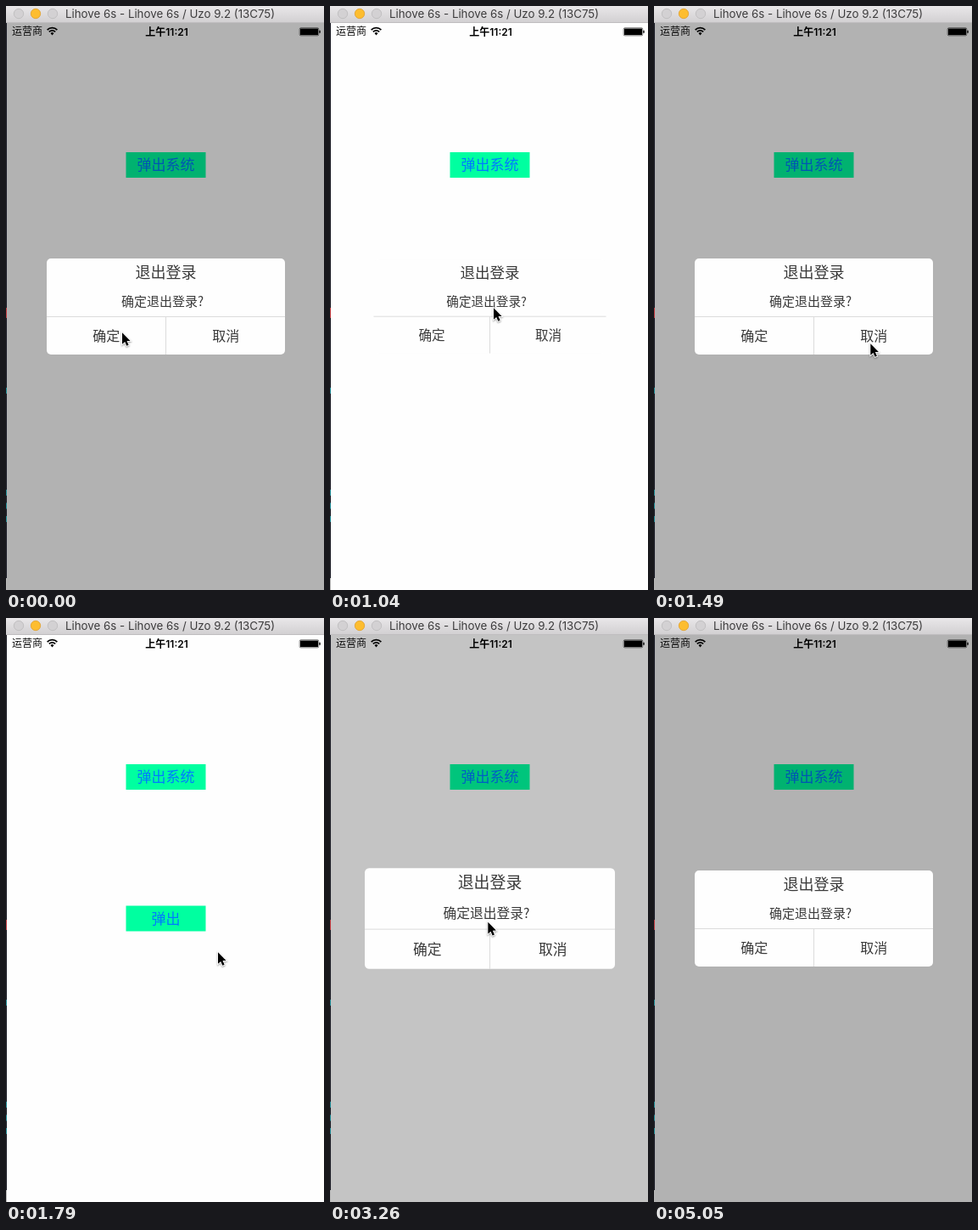
Recreate the animation shown at these times as an HTML page with a canvas. Size 375 by 687 pixels, loop 5490 ms.

```html
<!DOCTYPE html>
<html lang="zh">
<head>
<meta charset="utf-8">
<title>Dialog demo</title>
<style>
html, body { margin: 0; width: 100%; height: 100%; overflow: hidden; background: #fefefe; }
canvas { display: block; width: 375px; height: 687px; }
</style>
</head>
<body>
<canvas id="stage"></canvas>
<script>
const W = 375, H = 687, LOOP = 5490;
const TICK = 148.5, TICK_LEAD = 9;   // the screen refreshes in coarse steps
const CJK = '"Noto Sans CJK SC", "Noto Sans CJK JP", "Noto Sans CJK", sans-serif';
const canvas = document.getElementById('stage');
const ctx = canvas.getContext('2d');
const dpr = window.devicePixelRatio || 1;
canvas.width = W * dpr;
canvas.height = H * dpr;

// Ticks of the clicks that open and close the dialog in turn
const clicks = [-5, 2, 7, 12, 13, 17, 21];

// Where the mouse turns or rests
const path = [
  { k: 2, x: 136, y: 383 },
  { k: 7, x: 192, y: 354 },
  { k: 8, x: 232, y: 393 },
  { k: 9, x: 257, y: 398 },
  { k: 12, x: 249, y: 392 },
  { k: 13, x: 203, y: 360 },
  { k: 15, x: 130, y: 388 },
  { k: 17, x: 130, y: 388 },
  { k: 21, x: 195.5, y: 354 },
  { k: 24, x: 165, y: 362 },
  { k: 26, x: 228, y: 318 },
  { k: 28, x: 262, y: 241 },
  { k: 32, x: 282, y: 629 },
  { k: 33, x: 305, y: 667 }
];

const lerp = (a, b, p) => a + (b - a) * p;

function cursorAt(k) {
  const i = path.findIndex(p => p.k >= k);
  if (i < 1) return path[i];
  const a = path[i - 1], b = path[i], p = (k - a.k) / (b.k - a.k);
  return { x: lerp(a.x, b.x, p), y: lerp(a.y, b.y, p) };
}

// Pops slightly past full size, then settles while the backdrop darkens.
function dialogAt(k) {
  const past = clicks.filter(c => c <= k);
  if (past.length % 2 === 0) return null;
  const age = Math.min(2, k - past[past.length - 1]);
  const scale = age < 1 ? lerp(0.975, 1.05, age) : lerp(1.05, 1, age - 1);
  return { scale, dim: Math.min(0.3, age * 0.226) };
}

function rect(x, y, w, h, color) {
  ctx.fillStyle = color;
  ctx.fillRect(x, y, w, h);
}

function text(str, x, cy, size, color, align = 'center', weight = 400, family = CJK) {
  ctx.font = `${weight} ${size}px ${family}`;
  ctx.textAlign = align;
  ctx.fillStyle = color;
  ctx.fillText(str, x, cy + size * 0.38);
}

function titleBar() {
  const g = ctx.createLinearGradient(0, 0, 0, 20);
  g.addColorStop(0, '#e9e7e9');
  g.addColorStop(1, '#d1cfd1');
  rect(0, 0, W, 20, g);
  rect(0, 19, W, 1, '#bfbdbf');
  for (let i = 0; i < 3; i++) {
    ctx.beginPath();
    ctx.arc(15 + i * 20, 9, 5.7, 0, 7);
    ctx.fillStyle = i === 1 ? '#fdbd2f' : '#d3d1d3';
    ctx.fill();
    ctx.strokeStyle = i === 1 ? '#e0a02c' : '#bcbabc';
    ctx.lineWidth = 0.8;
    ctx.stroke();
  }
  text('Lihove 6s - Lihove 6s / Uzo 9.2 (13C75)', 70, 9.2, 13.3, '#3d3c3d', 'left', 400, 'Inter, sans-serif');
}

function statusBar() {
  text('运营商', 7, 29.7, 12, '#111', 'left');
  text('上午11:21', 189.5, 30, 12, '#000', 'center', 600, 'Inter, ' + CJK);

  ctx.strokeStyle = ctx.fillStyle = '#000';
  ctx.lineWidth = 1.7;
  for (const r of [5.2, 8.3]) {
    ctx.beginPath();
    ctx.arc(54.5, 34, r, -Math.PI * 0.75, -Math.PI * 0.25);
    ctx.stroke();
  }
  ctx.beginPath();
  ctx.moveTo(54.5, 34.5);
  ctx.arc(54.5, 34, 2.8, -Math.PI * 0.75, -Math.PI * 0.25);
  ctx.fill();

  ctx.lineWidth = 0.5;
  ctx.beginPath();
  ctx.roundRect(346.2, 25.7, 22.6, 9.2, 1.5);
  ctx.stroke();
  rect(347, 26.5, 21, 7.6, '#000');
  rect(369.3, 28.8, 1.4, 3, '#000');
}

function button(label, y) {
  rect(141.5, y, 94, 30, '#00ffa0');
  text(label, 188.5, y + 14.8, 17, '#007aff');
}

function dialog(scale) {
  ctx.save();
  ctx.translate(188.5, 353.5);
  ctx.scale(scale, scale);
  ctx.beginPath();
  ctx.roundRect(-140.5, -56.5, 281, 113, 5);
  ctx.fillStyle = '#fefefe';
  ctx.fill();
  rect(-140.5, 11.5, 281, 1, '#dcdcdc');
  rect(-0.5, 12, 1, 44.5, '#dcdcdc');
  text('退出登录', 0, -40.7, 18, '#3a3a3a');
  text('确定退出登录?', -52.5, -6.3, 15, '#3a3a3a', 'left');
  text('确定', -70.25, 34.2, 16, '#3a3a3a');
  text('取消', 70.75, 34.2, 16, '#3a3a3a');
  ctx.restore();
}

// A sliver of the dark editor behind the window
function windowEdge() {
  rect(0, 20, 1, 653, '#1b1c26');
  rect(0, 673, 1, 14, '#b8b8b8');
  rect(0, 355, 1, 12, '#c0393f');
  rect(0, 449, 1, 7, '#1c8a94');
  for (let i = 0; i < 3; i++) rect(0, 569 + i * 15.5, 1, 7, '#1c8a94');
}

const arrow = new Path2D('M0 0V13.6L3.2 10.8 5.3 15.6 7.6 14.6 5.5 9.9 9.6 9.7Z');

function cursor({ x, y }) {
  ctx.save();
  ctx.translate(x + 1, y + 1.2);
  ctx.shadowColor = 'rgba(0,0,0,0.4)';
  ctx.shadowBlur = 2 * dpr;
  ctx.shadowOffsetY = dpr;
  ctx.strokeStyle = '#fff';
  ctx.lineWidth = 1.8;
  ctx.stroke(arrow);
  ctx.shadowColor = 'transparent';
  ctx.fillStyle = '#000';
  ctx.fill(arrow);
  ctx.restore();
}

function draw(t) {
  const k = Math.floor((t + TICK_LEAD) / TICK);
  const popup = dialogAt(k), pointer = cursorAt(k);
  ctx.setTransform(dpr, 0, 0, dpr, 0, 0);
  rect(0, 0, W, H, '#fefefe');
  statusBar();
  button('弹出系统', 172);
  button('弹出', 338.5);
  if (popup) {
    rect(0, 20, W, H - 20, `rgba(0,0,0,${popup.dim})`);
    dialog(popup.scale);
  }
  titleBar();
  windowEdge();
  if (pointer) cursor(pointer);
}

const begin = performance.now();
function tick() {
  draw((performance.now() - begin) % LOOP);
  requestAnimationFrame(tick);
}
tick();
</script>
</body>
</html>
```
